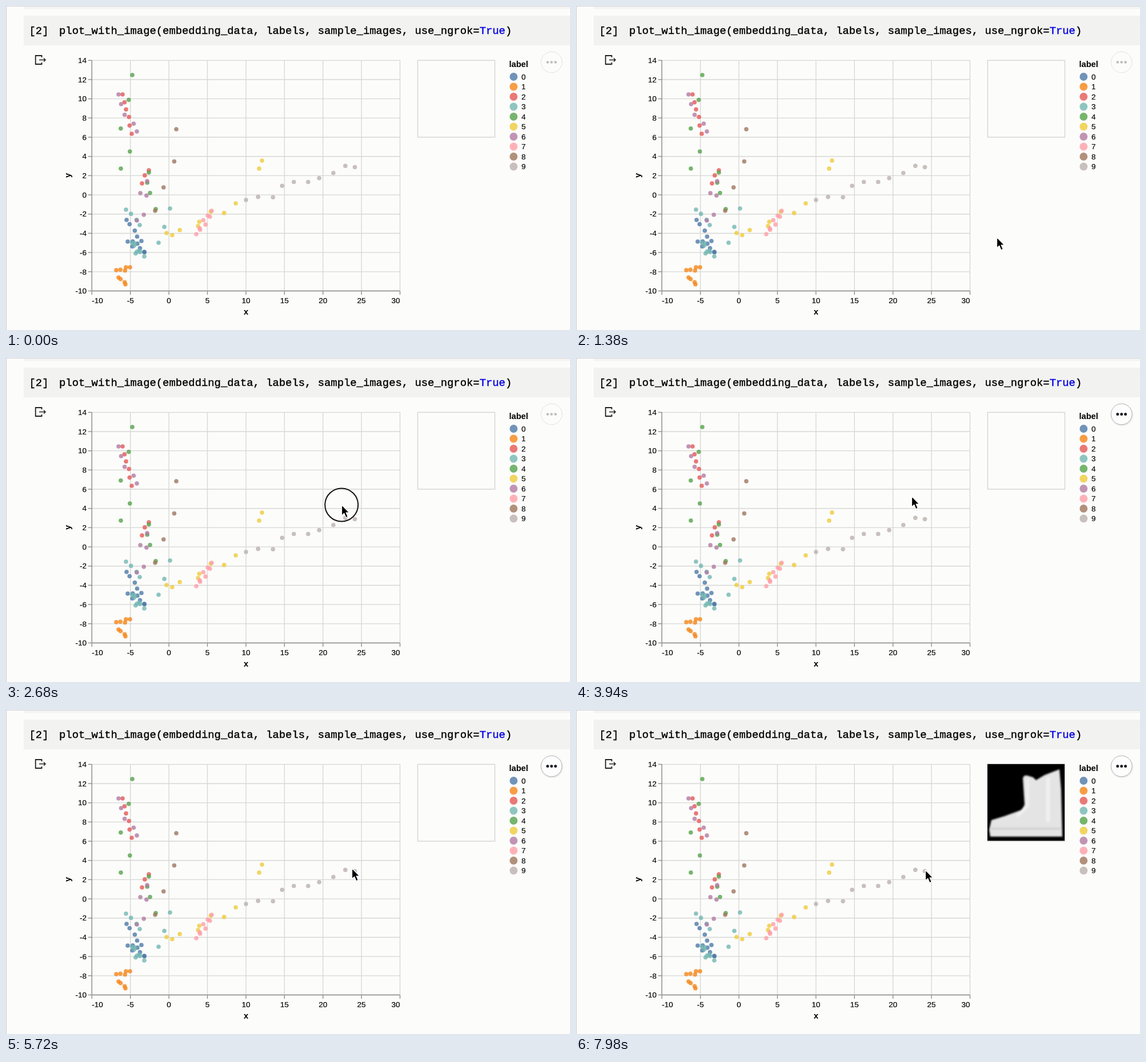
Animation of 987x568 px, one loop 8000 ms. Source, as an HTML page:

```html
<!DOCTYPE html>
<html lang="en">
<head>
<meta charset="utf-8">
<title>Embedding plot</title>
<style>
  html, body { margin: 0; width: 100%; height: 100%; overflow: hidden; background: #fcfcfb; }
  svg { display: block; width: 987px; height: 568px; }
  text { font-family: "Liberation Sans", Arial, sans-serif; font-size: 13.5px; fill: #000; stroke: #000; stroke-width: .15px; }
  .code { font-family: "Liberation Mono", "Courier New", monospace; font-size: 18.88px; white-space: pre; stroke-width: .4px; }
  .code tspan { fill: #0000e6; stroke: #0000e6; }
  .title { font-weight: bold; font-size: 14.6px; stroke: none; }
  .grid { stroke: #d7d7d4; stroke-width: 1.35; }
  .axis { stroke: #8b8b8b; stroke-width: 1.35; }
</style>
</head>
<body>
<svg viewBox="0 0 987 568">
  <defs>
    <clipPath id="frame"><rect x="720" y="94.5" width="135" height="135"/></clipPath>
    <filter id="soft" x="-10%" y="-10%" width="120%" height="120%"><feGaussianBlur stdDeviation="1.6"/></filter>
    <filter id="shadow" x="-30%" y="-30%" width="160%" height="160%">
      <feDropShadow dx=".5" dy="1" stdDeviation="1.2" flood-opacity=".16"/>
    </filter>
  </defs>

  <rect width="987" height="568" fill="#fcfcfb"/>
  <rect x="31" width="956" height="5" fill="#f3f3f3"/>
  <rect width="987" height="1" fill="#d6d6da"/>
  <rect width="1" height="568" fill="#c9c9c9"/>
  <rect x="31" y="17" width="956" height="52" fill="#f2f2f0"/>
  <text class="code" x="40.5" y="49">[2]</text>
  <text class="code" x="93" y="49">plot_with_image(embedding_data, labels, sample_images, use_ngrok=<tspan>True</tspan>)</text>

  <g fill="none" stroke="#222" stroke-width="1.8">
    <path d="M62.5 90V87H51.7V102H62.5V99"/>
    <path d="M58 94.5H69M66 91.5L69 94.5L66 97.5" stroke-width="1.5"/>
  </g>

  <g id="chart"></g>
  <text class="title" x="420" y="540.5" text-anchor="middle">x</text>
  <text class="title" transform="translate(113 297) rotate(-90)" text-anchor="middle">y</text>
  <text class="title" x="880.5" y="106.5">label</text>
  <g id="points"></g>
  <g id="legend"></g>

  <rect x="720.5" y="95.3" width="135" height="134.7" fill="none" stroke="#d3d3d3" stroke-width="1.35"/>
  <g id="preview" clip-path="url(#frame)">
    <rect x="720" y="94.5" width="135" height="135" fill="#000"/>
    <g filter="url(#soft)">
      <path d="M782 120Q783 114 790 115L800 118L805 123L820 114L846 104L849 140L851 222H725L723 210L727 193L750 186L780 175L785 166Z" fill="#e4e4e4"/>
      <path d="M790 122V168L772 186M826 118V196" fill="none" stroke="#f0f0f0" stroke-width="6"/>
      <path d="M727 208H848" stroke="#cdcdcd" stroke-width="3"/>
    </g>
  </g>

  <g id="idle"></g>
  <g id="active"></g>

  <circle id="click" cx="587.2" cy="257.5" r="29" fill="none" stroke="#111" stroke-width="2"/>
  <path id="cursor" d="M0 0V18.6L4.2 14.8L7.4 22.2L10.8 20.7L7.6 13.5H13.2Z" fill="#000" stroke="#fff" stroke-width="1.2" stroke-linejoin="round"/>
</svg>
<script>
const LOOP = 8000;
const COLORS = ['#4c78a8', '#f58518', '#e45756', '#72b7b2', '#54a24b',
  '#eeca3b', '#b279a2', '#ff9da6', '#9d755d', '#bab0ac'];
const $ = id => document.getElementById(id);
const clamp = u => Math.min(1, Math.max(0, u));

function add(parent, tag, attrs, text) {
  const el = document.createElementNS('http://www.w3.org/2000/svg', tag);
  for (const k in attrs) el.setAttribute(k, attrs[k]);
  if (text !== undefined) el.textContent = text;
  $(parent).append(el);
}
const line = (cls, x1, y1, x2, y2) => add('chart', 'line', { class: cls, x1, y1, x2, y2 });
const label = (x, y, anchor, text) => add('chart', 'text', { x, y, 'text-anchor': anchor }, text);
const dot = (parent, cx, cy, r, fill, opacity = 1) => add(parent, 'circle', { cx, cy, r, fill, opacity });

// Axes
const X0 = 150.3, X1 = 689.5, Y0 = 95.3, Y1 = 499.5;
const px = v => X0 + (v + 10) / 40 * (X1 - X0);
const py = v => Y1 - (v + 10) / 24 * (Y1 - Y0);

for (let v = -10; v <= 30; v += 5) {
  line('grid', px(v), Y0, px(v), Y1);
  line('axis', px(v), Y1, px(v), Y1 + 6.7);
  label(px(v), 520.5, v === -10 ? 'start' : v === 30 ? 'end' : 'middle', v);
}
for (let v = -10; v <= 14; v += 2) {
  line('grid', X0, py(v), X1, py(v));
  line('axis', X0 - 6.7, py(v), X0, py(v));
  label(141, py(v) + 4.7, 'end', v);
}
line('axis', X0, Y0, X0, Y1);
line('axis', X0, Y1, X1, Y1);

// Scatter: points spread along a line, jittered between its fixed ends
let seed = 7;
const jitter = s => {
  seed = seed * 16807 % 2147483647;
  return (seed / 2147483647 * 2 - 1) * s;
};
function strand(k, n, x1, y1, x2, y2, spread) {
  for (let i = 0; i < n; i++) {
    const u = i / (n - 1), s = u % 1 ? spread : 0;
    dot('points', x1 + (x2 - x1) * u + jitter(s), y1 + (y2 - y1) * u + jitter(s), 3.8, COLORS[k], .8);
  }
}
strand(0, 5, 211, 375, 237, 412, 3);
strand(0, 7, 213, 413, 242, 431, 6);
strand(1, 5, 193, 463, 217, 458, 4);
strand(1, 4, 197, 476, 209, 488, 3);
strand(2, 6, 204, 155, 220, 224, 2);
strand(2, 3, 250, 288, 238, 311, 6);
strand(3, 4, 210, 357, 234, 384, 3);
strand(3, 3, 287, 355, 267, 415, 6);
strand(3, 8, 221, 415, 242, 439, 8);
strand(4, 5, 221, 121, 201, 285, 14);
strand(4, 4, 250, 292, 262, 356, 7);
strand(5, 2, 448, 271, 443, 285, 0);
strand(5, 8, 402, 346, 281, 398, 12);
strand(6, 5, 197, 155, 229, 220, 6);
strand(6, 5, 247, 307, 229, 376, 10);
strand(7, 8, 360, 359, 333, 400, 6);
strand(8, 4, 298, 216, 261, 359, 9);
strand(9, 10, 420, 340, 610.5, 282.5, 9);

COLORS.forEach((color, k) => {
  const y = 124 + k * 17.5;
  dot('legend', 888.3, y, 6.9, color, .8);
  add('legend', 'text', { x: 902, y: y + 4.8 }, k);
});

// Menu button in its two states
function button(id, ring, ink, r) {
  add(id, 'circle', { cx: 954.7, cy: 98.5, r: 18.3, ...ring });
  for (let i = -1; i <= 1; i++) dot(id, 954.7 + i * 6.9, 98.5, r, ink);
}
button('idle', { fill: 'none', stroke: '#c6c6d0', 'stroke-dasharray': '1.6 1.6' }, '#bcbcbc', 2.3);
button('active', { fill: '#fdfdfd', stroke: '#b0b0b0', filter: 'url(#shadow)' }, '#1b1e23', 2.5);

// Pointer moves: begin, end, then where it comes to rest
const ENTER = { t: 960, x: 775, y: 570 };
const MOVES = [
  [960, 1340, 736.5, 405.5],
  [1500, 2300, 587.5, 257.5],
  [2940, 3300, 587.5, 242.5],
  [4900, 5600, 605.5, 277.5],
  [5860, 6100, 611.5, 280.5]
];
const ease = u => u * u * (3 - 2 * u);

function pointer(t) {
  let { x, y } = ENTER;
  for (const [a, b, tx, ty] of MOVES) {
    const u = ease(clamp((t - a) / (b - a)));
    x += (tx - x) * u;
    y += (ty - y) * u;
  }
  return [x, y];
}
const show = (id, on) => $(id).setAttribute('visibility', on ? 'visible' : 'hidden');

function draw(t) {
  $('cursor').setAttribute('transform', `translate(${pointer(t)})`);
  show('cursor', t >= ENTER.t);
  show('click', t >= 2600 && t < 2820);
  show('preview', t >= 6140);
  const lit = clamp((t - 2800) / 300);
  $('active').setAttribute('opacity', lit);
  $('idle').setAttribute('opacity', 1 - lit);
}

const start = performance.now();
function tick() {
  draw((performance.now() - start) % LOOP);
  requestAnimationFrame(tick);
}
tick();
</script>
</body>
</html>
```
